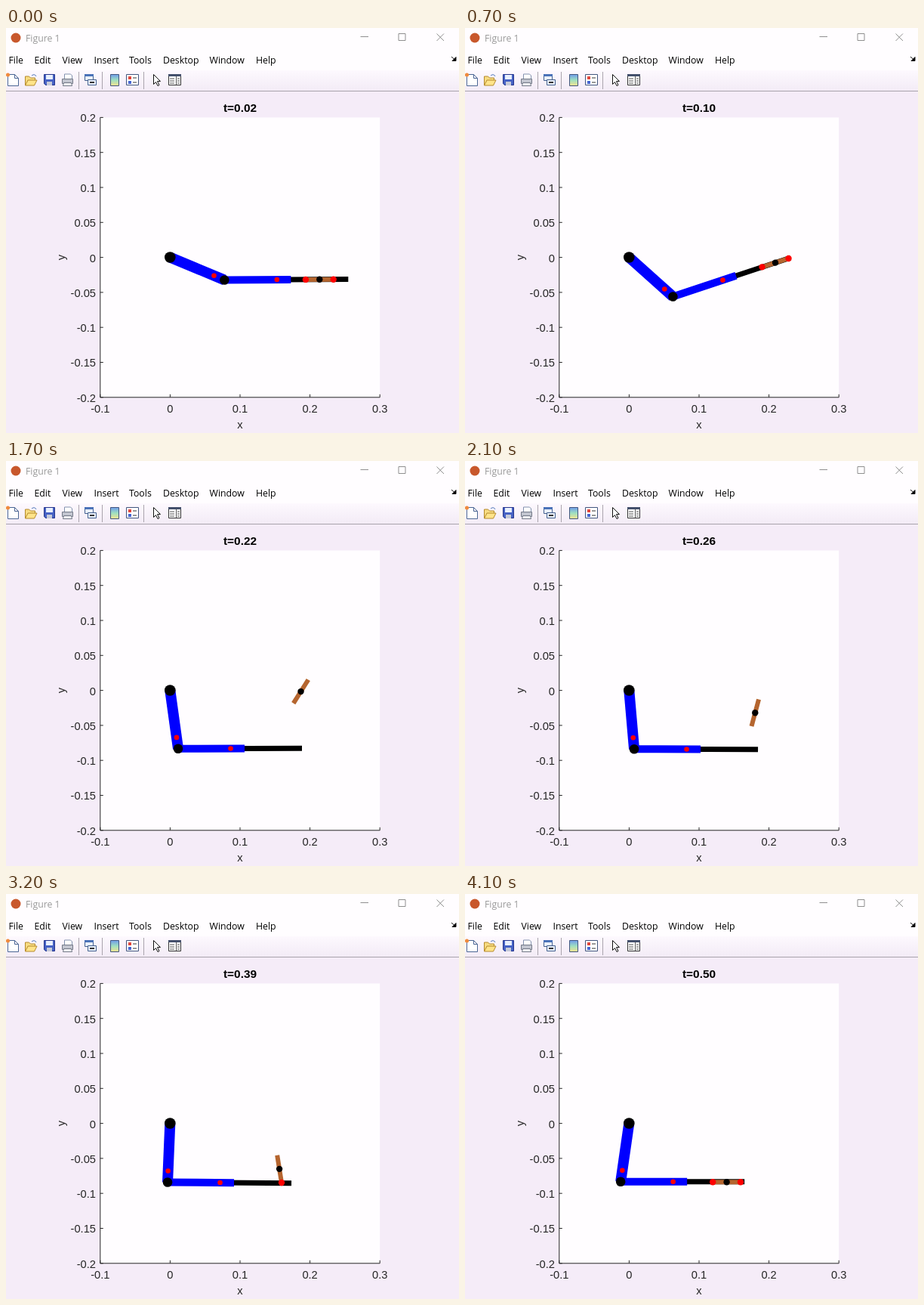
An HTML page that plays this animation: 600 by 536 pixels, repeating every 4.2 s.

```html
<!DOCTYPE html>
<html lang="en">
<head>
<meta charset="utf-8">
<title>Figure 1</title>
<style>
  html, body { margin: 0; width: 100%; height: 100%; overflow: hidden; }
  svg { display: block; }
  .ui { font: 12.3px "Open Sans", "Noto Sans", sans-serif; }
  .plot { font: 14.7px "Liberation Sans", Arial, sans-serif; fill: #262626; }
  .middle { text-anchor: middle; }
  .end { text-anchor: end; }
  #clock { font-size: 15.4px; font-weight: bold; fill: #000; }
</style>
</head>
<body>
<svg id="stage" width="600" height="536" viewBox="0 0 600 536">
  <defs>
    <linearGradient id="bar" x2="0" y2="1">
      <stop stop-color="#fdf9fe"/><stop offset="1" stop-color="#f3ebf6"/>
    </linearGradient>
    <linearGradient id="spectrum" x2="0" y2="1">
      <stop stop-color="#6f9bea"/><stop offset=".5" stop-color="#9fe0c0"/><stop offset="1" stop-color="#f3e490"/>
    </linearGradient>
  </defs>
  <rect width="600" height="536" fill="#f5ecf8"/>
  <rect width="600" height="56" fill="#fffdff"/>
  <rect y="56" width="600" height="27" fill="url(#bar)"/>
  <path d="M0 83.5H600" stroke="#a9a3ac"/>

  <g class="ui">
    <circle cx="13" cy="13" r="6.5" fill="#c8582c"/>
    <text x="26" y="17.5" fill="#999">Figure 1</text>
    <path d="M469.5 11.5h10.5M520 7.5h9v9h-9zM570.5 7.5l9.5 9.5m0-9.5l-9.5 9.5" fill="none" stroke="#8f8f8f"/>
    <g id="menu"></g>
    <path d="M590 38l4 3.5M596 38.5v5h-5z" stroke="#111"/>
  </g>

  <g id="toolbar" stroke-width="1">
    <path d="M96.5 58v23M127.5 58v23M182.5 58v23" stroke="#aaa4ad"/>
    <path d="M2.5 61.5h9l5 5v10h-14zM11.5 61.5v5h5" fill="#fff" stroke="#4b6694"/>
    <circle cx="2.5" cy="62" r="2.5" fill="#f08a3c"/>
    <path d="M25.5 76v-12h5l2 2h6v3" fill="#f7dc82" stroke="#b58a2c"/>
    <path d="M25.5 76l3.5-7h12l-3.5 7z" fill="#ffe48a" stroke="#b58a2c"/>
    <path d="M34 63q4-3 6 1" fill="none" stroke="#4a73b8"/>
    <path d="M50.5 61.5h14v14h-12l-2-2z" fill="#4662c4" stroke="#26358c"/>
    <path d="M53 62h9v6h-9z" fill="#e9f0ff"/><path d="M54 71h7v5h-7z" fill="#c6cad8"/>
    <path d="M77.5 68v-7h8l2 2v5z" fill="#fff" stroke="#8291ae"/>
    <path d="M74.5 67.5h14v6h-14z" fill="#c3c6d0" stroke="#737987"/>
    <path d="M76.5 72.5h10l1 4h-12z" fill="#f3f3f7" stroke="#737987"/>
    <path d="M104.5 61.5h11v8h-11z" fill="#eaf1fb" stroke="#44608f"/>
    <path d="M104 62.5h12" stroke="#4a72b8" stroke-width="3"/>
    <path d="M108.5 68.5h11v7h-11z" fill="#eaf1fb" stroke="#44608f"/>
    <path d="M111 72h6" stroke="#333" stroke-width="2"/>
    <path d="M138.5 61.5h11v15h-11z" fill="url(#spectrum)" stroke="#42567f"/>
    <path d="M159.5 61.5h16v14h-16z" fill="#fff" stroke="#42567f"/>
    <path d="M162 64h4v4h-4z" fill="#e0463c"/><path d="M162 70h4v4h-4z" fill="#4766d2"/>
    <path d="M168 66h5m-5 6h5" stroke="#333"/>
    <path d="M195.5 61.5v13l3-3 2.5 5 2-1-2.5-5h4z" fill="#fff" stroke="#111"/>
    <path d="M215.5 61.5h16v14h-16z" fill="#fff" stroke="#333"/>
    <path d="M215 62.5h17" stroke="#44506c" stroke-width="3"/>
    <path d="M225.5 64v11M217 67h6m-6 3h6m-6 3h6m4-6h3m-3 3h3m-3 3h3" stroke="#555"/>
  </g>

  <rect x="124.8" y="118.4" width="370.4" height="370.4" fill="#fffdff"/>
  <g class="plot">
    <g id="ticks"></g>
    <path id="axes" fill="none" stroke="#262626"/>
    <text class="middle" x="310" y="529.5">x</text>
    <text class="middle" transform="translate(78 303.5) rotate(-90)">y</text>
    <text class="middle" id="clock" x="310" y="111"></text>
  </g>
  <g id="arm"></g>
</svg>
<script>
const $ = id => document.getElementById(id);
const RAD = Math.PI / 180;
const BLUE = '#00f', BLACK = '#000', RED = '#f00', BROWN = '#b5652f';

const menu = { File: 3.5, Edit: 37.5, View: 74.5, Insert: 116.5, Tools: 163, Desktop: 208, Window: 269.5, Help: 331 };
$('menu').innerHTML = Object.entries(menu).map(([word, x]) => `<text x="${x}" y="46.5">${word}</text>`).join('');

const LEFT = 124.8, TOP = 118.4, SIZE = 370.4, BOTTOM = TOP + SIZE;
let axes = `M${LEFT} ${TOP}V${BOTTOM}H${LEFT + SIZE}`, labels = '';
for (let i = 0; i <= 8; i++) {
  const y = TOP + i * SIZE / 8;
  axes += `M${LEFT} ${y}h4`;
  labels += `<text class="end" x="119" y="${y + 5.9}">${+(0.2 - i * 0.05).toFixed(2)}</text>`;
}
for (let i = 0; i <= 4; i++) {
  const x = LEFT + i * SIZE / 4;
  axes += `M${x} ${BOTTOM}v-4`;
  labels += `<text class="middle" x="${x}" y="509">${+(i * 0.1 - 0.1).toFixed(1)}</text>`;
}
$('axes').setAttribute('d', axes);
$('ticks').innerHTML = labels;

// Monotone cubic through [time, value] points
function curve(...pts) {
  const slope = pts.slice(1).map((p, i) => (p[1] - pts[i][1]) / (p[0] - pts[i][0]));
  const tangent = pts.map((_, i) => {
    const a = slope[i - 1] ?? slope[i], b = slope[i] ?? a;
    return a * b > 0 ? 2 * a * b / (a + b) : 0;
  });
  return t => {
    let i = 0;
    while (i < pts.length - 2 && t > pts[i + 1][0]) i++;
    const [t0, v0] = pts[i], [t1, v1] = pts[i + 1], h = t1 - t0;
    const s = Math.min(1, Math.max(0, (t - t0) / h)), r = 1 - s;
    return v0 * r * r * (1 + 2 * s) + v1 * s * s * (3 - 2 * s) + h * s * r * (tangent[i] * r - tangent[i + 1] * s);
  };
}

// Angles in degrees, clockwise from the x axis
const upperAngle = curve([.02, 22.6], [.09, 37.3], [.1, 41.8], [.14, 61.8], [.16, 71], [.18, 77], [.22, 82.1], [.31, 88], [.39, 92.4], [.5, 98.2]);
const lowerAngle = curve([.02, -.3], [.09, -14], [.1, -18.3], [.14, -28.6], [.16, -25], [.19, -8], [.22, -.2], [.31, .4], [.39, .5], [.5, 0]);
const slide = curve([.02, 126], [.1, 142.8], [.14, 169]);
const heldAngle = curve([.02, -.3], [.09, -14], [.1, -18], [.14, -23.6]);
const footX = curve([.29, 378.5], [.31, 374.5], [.39, 365], [.5, 365]);

const SHOULDER = [217.3, 303.5], HALF = 18.4, RELEASE = .14, LANDING = .29;
const along = ([x, y], angle, d) => [x + d * Math.cos(angle * RAD), y + d * Math.sin(angle * RAD)];
const line = (a, b, color, width) => `<path d="M${a}L${b}" stroke="${color}" stroke-width="${width}"/>`;
const dot = ([x, y], color, r) => `<circle cx="${x}" cy="${y}" r="${r}" fill="${color}"/>`;

function stickPose(t, elbow, lower) {
  if (t < RELEASE) return { center: along(elbow, lower, slide(t)), angle: heldAngle(t), touching: 2 };
  if (t < LANDING) {
    const s = t - RELEASE;
    return {
      center: [403 - 156 * s, 292.5 - 206 * s + 4542 * s * s],
      angle: -23.6 - 428 * s,
      touching: s ? 0 : 1
    };
  }
  const fall = Math.min(90, 3.63 * Math.sinh(20.6 * (t - .31)));
  const angle = -90 - fall;
  return { center: along([footX(t), elbow[1] + .6], angle, HALF), angle, touching: fall < 90 ? 1 : 2 };
}

function draw(t) {
  const upper = upperAngle(t), lower = lowerAngle(t);
  const elbow = along(SHOULDER, upper, 78);
  const { center, angle, touching } = stickPose(t, elbow, lower);
  const foot = along(center, angle, -HALF), tip = along(center, angle, HALF);
  $('clock').textContent = 't=' + t.toFixed(2);
  $('arm').innerHTML =
    line(SHOULDER, elbow, BLUE, 14) +
    line(elbow, along(elbow, lower, 164), BLACK, 7) +
    line(elbow, along(elbow, lower, 88), BLUE, 10) +
    dot(SHOULDER, BLACK, 7.3) + dot(elbow, BLACK, 6.3) +
    dot(along(SHOULDER, upper, 63), RED, 3.3) +
    dot(along(elbow, lower, 69.5), RED, 3.3) +
    line(foot, tip, BROWN, 6) + dot(center, BLACK, 4.2) +
    (touching > 0 ? dot(foot, RED, 4.2) : '') +
    (touching > 1 ? dot(tip, RED, 4.2) : '');
}

function tick(now) {
  const step = Math.floor(now / 100) % 42;
  draw(Math.round((.015 + .0118 * step) * 100 + 1e-6) / 100);
  requestAnimationFrame(tick);
}
requestAnimationFrame(tick);
</script>
</body>
</html>
```
